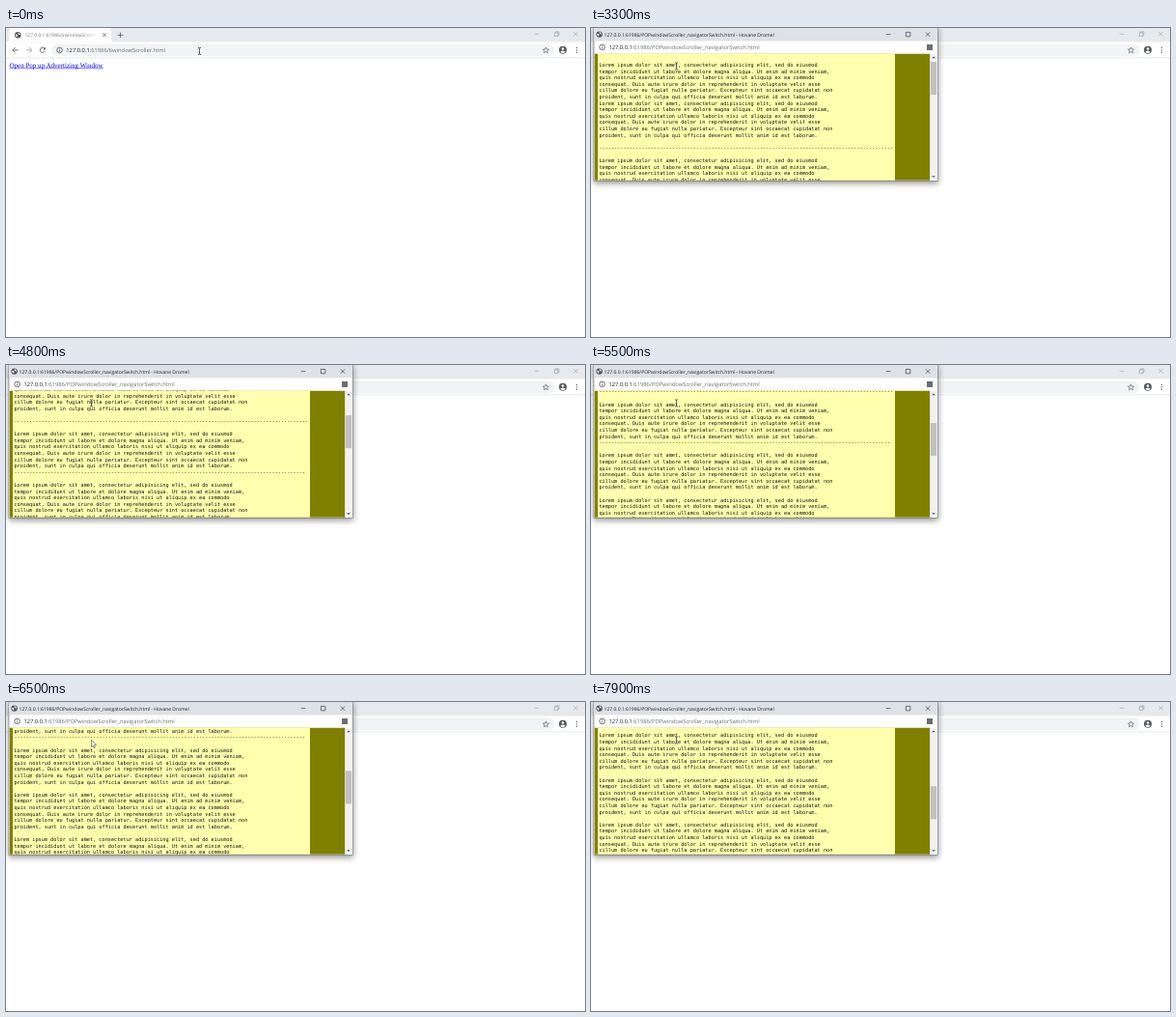
These frames come from a looping animation (600 by 320 pixels, 8000 ms). An HTML page:

```html
<!DOCTYPE html>
<html lang="en">
<head>
<meta charset="utf-8">
<title>Pop-up window scroller</title>
<style>
  html, body { margin: 0; width: 100%; height: 100%; overflow: hidden; background: #fff; }
  svg { display: block; width: 600px; height: 320px; }
  text { font-family: "Open Sans", "Noto Sans", sans-serif; text-rendering: geometricPrecision; white-space: pre; }
  .url { font-size: 5.77px; fill: #6b6f73; }
  .url tspan { fill: #202124; }
  .small { font-size: 5px; }
  .link { font: 7.03px "Liberation Serif", serif; fill: #0000ee; }
  .mono text { font: 5.22px "DejaVu Sans Mono", monospace; fill: #111; }
  .line { fill: none; stroke: #5f6368; stroke-width: .9; }
  .ctl { fill: none; stroke: #8f9194; stroke-width: .55; }
  #tabText { fill: #75797d; }
  .active .ctl, .popup .ctl { stroke: #111; }
  .active #tabText { fill: #55595d; }
  #strip { fill: #e7eaed; }
  .active #strip { fill: #dee1e6; }
</style>
</head>
<body>
<svg viewBox="0 0 600 320">
  <defs>
    <linearGradient id="fade">
      <stop offset="0" stop-color="#fff" stop-opacity="0"/>
      <stop offset="1" stop-color="#fff"/>
    </linearGradient>
    <filter id="shadow" x="-10%" y="-10%" width="120%" height="125%">
      <feGaussianBlur stdDeviation="3"/>
    </filter>
    <clipPath id="view"><rect x="3.5" y="26.5" width="355" height="131.3"/></clipPath>
    <clipPath id="tabClip"><rect x="19" y="0" width="75" height="14"/></clipPath>
    <g id="globe">
      <circle r="3.2" fill="#505458"/>
      <path d="M-2.4 -.9 L-.6 -.6 L.2 .6 L-.9 1.2 L-1 2.4 Q-2.6 1.2 -2.4 -.9Z M.3 -2.5 Q2 -2 2.4 -.2 L1 -.3 L0 -1.4Z" fill="#e4e6e8"/>
    </g>
    <g id="info">
      <circle r="2.8" class="line" stroke-width=".7"/>
      <path class="line" d="M0 -1.6V-.8M0 -.2V1.6"/>
    </g>
    <path id="cross" d="M-2.2 -2.2L2.2 2.2M2.2 -2.2L-2.2 2.2"/>
  </defs>

  <rect width="600" height="320" fill="#fff"/>

  <g id="main">
    <rect id="strip" width="600" height="14.5"/>
    <path d="M0 14.5Q3.5 14.5 3.5 11V3Q3.5 0 6.5 0H106Q109 0 109 3V11Q109 14.5 112.5 14.5Z" fill="#fff"/>
    <use href="#globe" x="12.3" y="7.3"/>
    <g clip-path="url(#tabClip)">
      <text id="tabText" x="19.5" y="9.1" style="font-size:4.95px">127.0.0.1:61986/6windowScroller.html</text>
      <rect x="82" y="1" width="12" height="12" fill="url(#fade)"/>
    </g>
    <path class="line" style="stroke-width:.75" d="M100 5.2L104 9.2M104 5.2L100 9.2"/>
    <path class="line" d="M115.8 7.3H121.4M118.6 4.5V10.1"/>
    <path class="ctl" d="M547.7 6.3H552.3M568.4 4.9H572V8.5H568.4ZM569.4 4.9V3.9H573V7.5H572"/>
    <use class="ctl" href="#cross" x="590.4" y="6.2"/>

    <rect x="47.5" y="16.6" width="521" height="12.6" rx="6.3" fill="#f1f3f4"/>
    <path class="line" d="M12.6 22.9H7M9.6 20.2L6.9 22.9L9.6 25.6"/>
    <path class="line" style="stroke:#a3a6a9" d="M21.2 22.9H26.8M24.2 20.2L26.9 22.9L24.2 25.6"/>
    <path class="line" d="M40 21.1A2.6 2.6 0 1 0 40.4 23.6"/>
    <path d="M40.9 19.8V22.5H38.2Z" fill="#5f6368"/>
    <use href="#info" x="55.5" y="22.9"/>
    <text class="url" x="62.3" y="25"><tspan>127.0.0.1</tspan>:61986/6windowScroller.html</text>
    <path class="line" style="stroke-width:.7" d="M559.5 19.9L560.4 22L562.6 22.2L560.9 23.6L561.4 25.8L559.5 24.6L557.6 25.8L558.1 23.6L556.4 22.2L558.6 22Z"/>
    <circle cx="577" cy="22.8" r="4" fill="#55595d"/>
    <circle cx="577" cy="21.5" r="1.25" fill="#fff"/>
    <path d="M574.4 25.1Q574.8 23.5 577 23.5T579.6 25.1Q578.6 26.1 577 26.1T574.4 25.1Z" fill="#fff"/>
    <g fill="#5f6368">
      <circle cx="591.4" cy="20.5" r=".7"/><circle cx="591.4" cy="22.9" r=".7"/><circle cx="591.4" cy="25.3" r=".7"/>
    </g>
    <rect y="30.6" width="600" height=".6" fill="#d8dadd"/>
    <text class="link" x="3.5" y="40.9">Open Pop up Advertizing Window</text>
    <rect x="3.5" y="41.6" width="97.2" height=".55" fill="#0000ee"/>
  </g>

  <g id="status">
    <path d="M-1 311.3H198.5Q200.5 311.3 200.5 313.3V321H-1Z" fill="#f1f3f4" stroke="#c4c7ca" stroke-width=".5"/>
    <text class="small" x="2.5" y="317.6" fill="#5f6368">127.0.0.1:61986/6windowScroller.html#</text>
  </g>

  <g id="popup" class="popup">
    <rect x="3" y="1" width="357" height="160" fill="#000" opacity=".42" filter="url(#shadow)"/>
    <rect x="3" y="-1" width="356.2" height="159.3" fill="#fff" stroke="#6d6f71" stroke-width=".6"/>
    <rect x="3.3" y="0" width="355.6" height="13.4" fill="#dee1e6"/>
    <use href="#globe" x="8.6" y="6.6"/>
    <text class="small" x="13.6" y="8.5" fill="#222">127.0.0.1:61986/POPwindowScroller_navigatorSwitch.html - Hovane Dromel</text>
    <path class="ctl" d="M305.8 6.6H310.4M326.4 4.4H330.8V8.8H326.4Z"/>
    <use class="ctl" href="#cross" x="349" y="6.6"/>
    <use href="#info" x="11.6" y="19.9"/>
    <text class="url" x="18.4" y="22"><tspan>127.0.0.1</tspan>:61986/POPwindowScroller_navigatorSwitch.html</text>
    <rect x="348" y="17" width="6" height="6" fill="#6a6e72"/>
    <g id="content" clip-path="url(#view)">
      <rect x="3.5" y="26.5" width="348" height="132" fill="#808000"/>
      <g id="doc" class="mono"><rect x="7" y="30" width="308" height="443" fill="#ffffae"/></g>
      <rect x="351.3" y="26.5" width="7.3" height="132" fill="#f1f1f1"/>
      <path d="M353.2 31.2L355 29.4L356.8 31.2ZM353.2 153.2L355 155L356.8 153.2Z" fill="#505050"/>
      <rect id="thumb" x="351.9" y="34" width="6.2" height="34" fill="#c1c1c1"/>
    </g>
  </g>

  <g id="cursor">
    <g id="beam" fill="none">
      <path d="M-1.6 -3.5H1.6M0 -3.5V3.5M-1.6 3.5H1.6" stroke="#fff" stroke-width="1.4" opacity=".5"/>
      <path d="M-1.6 -3.5H-.4L0 -3.1L.4 -3.5H1.6M0 -3.1V3.1M-1.6 3.5H-.4L0 3.1L.4 3.5H1.6" stroke="#222" stroke-width=".7"/>
    </g>
    <path id="arrow" d="M0 0V7.2L1.7 5.7L2.8 8.2L4 7.7L2.9 5.2H5.1Z" fill="#fff" stroke="#222" stroke-width=".5"/>
    <path id="hand" d="M-.6 0Q0 -.7 .6 0V3L3.9 3.7Q4.5 4 4.4 5L3.8 8H.2L-2 5.2Q-2.2 4.2 -1.3 4.3L-.6 5Z" fill="#fff" stroke="#222" stroke-width=".5"/>
  </g>
</svg>

<script>
const $ = id => document.getElementById(id);
const LOOP = 8000, TICK = 100;
const VIEW_TOP = 26.5, FIRST = 15.94, LINE = 6.6, STEP = 4.38;
const OPEN = 3100, SCROLL_FROM = 3200;

const para = [
  "Lorem ipsum dolor sit amet, consectetur adipisicing elit, sed do eiusmod",
  "tempor incididunt ut labore et dolore magna aliqua. Ut enim ad minim veniam,",
  "quis nostrud exercitation ullamco laboris nisi ut aliquip ex ea commodo",
  "consequat. Duis aute irure dolor in reprehenderit in voluptate velit esse",
  "cillum dolore eu fugiat nulla pariatur. Excepteur sint occaecat cupidatat non",
  "proident, sunt in culpa qui officia deserunt mollit anim id est laborum."
];
const rule = n => "-".repeat(n);
const lines = [...para, ...para, "", rule(97), "", ...para, rule(96), ""];
for (let i = 0; i < 6; i++) lines.push(...para, "");

lines.forEach((s, i) => {
  if (!s) return;
  const el = document.createElementNS($("doc").namespaceURI, "text");
  el.setAttribute("x", 8.4);
  el.setAttribute("y", VIEW_TOP + FIRST + i * LINE + 1.9);
  el.textContent = s;
  $("doc").append(el);
});

// pointer path: time, x, y
const path = [
  [0, 200.5, 23.9], [1600, 200.5, 23.9], [1800, 202, 23.8], [2000, 199, 24.2],
  [2100, 192.5, 24.8], [2500, 118, 35], [2800, 88.5, 39.4], [LOOP, 88.5, 39.4]
];

function pointerAt(t) {
  const i = path.findIndex(p => p[0] > t);
  const [t0, x0, y0] = path[i - 1], [t1, x1, y1] = path[i];
  const k = (t - t0) / (t1 - t0);
  return [x0 + (x1 - x0) * k, y0 + (y1 - y0) * k];
}

function sampled(t) {
  const q = Math.floor(t / TICK) * TICK;
  for (const h of [2800, 4100]) if (q >= h && q < h + 300) return h;
  return q;
}

const show = (id, on) => $(id).setAttribute("visibility", on ? "visible" : "hidden");

function cursorKind(t, x, y, scroll) {
  if (t < OPEN) {
    if (y < 29.5) return "beam";
    return x < 101 && y > 35 ? "hand" : "arrow";
  }
  if (t < SCROLL_FROM) return "arrow";
  const row = Math.floor((40.2 - VIEW_TOP - FIRST + scroll) / LINE + .5);
  return lines[row] ? "beam" : "arrow";
}

function draw(t) {
  const q = sampled(t);
  const scroll = Math.max(0, (q - SCROLL_FROM) / TICK * STEP);
  const [x, y] = pointerAt(q);
  const kind = cursorKind(q, x, y, scroll);

  $("main").setAttribute("class", q >= 700 && q < OPEN ? "active" : "");
  show("status", q < OPEN && kind === "hand");
  $("popup").style.display = q >= OPEN ? "" : "none";
  $("content").style.display = q >= SCROLL_FROM ? "" : "none";
  $("doc").setAttribute("transform", `translate(0 ${-scroll})`);
  $("thumb").setAttribute("y", 34 + scroll * .259);
  $("cursor").setAttribute("transform", `translate(${x} ${y})`);
  for (const id of ["beam", "arrow", "hand"]) show(id, id === kind);
}

const start = performance.now();
function frame() {
  draw((performance.now() - start) % LOOP);
  requestAnimationFrame(frame);
}
frame();
</script>
</body>
</html>
```
